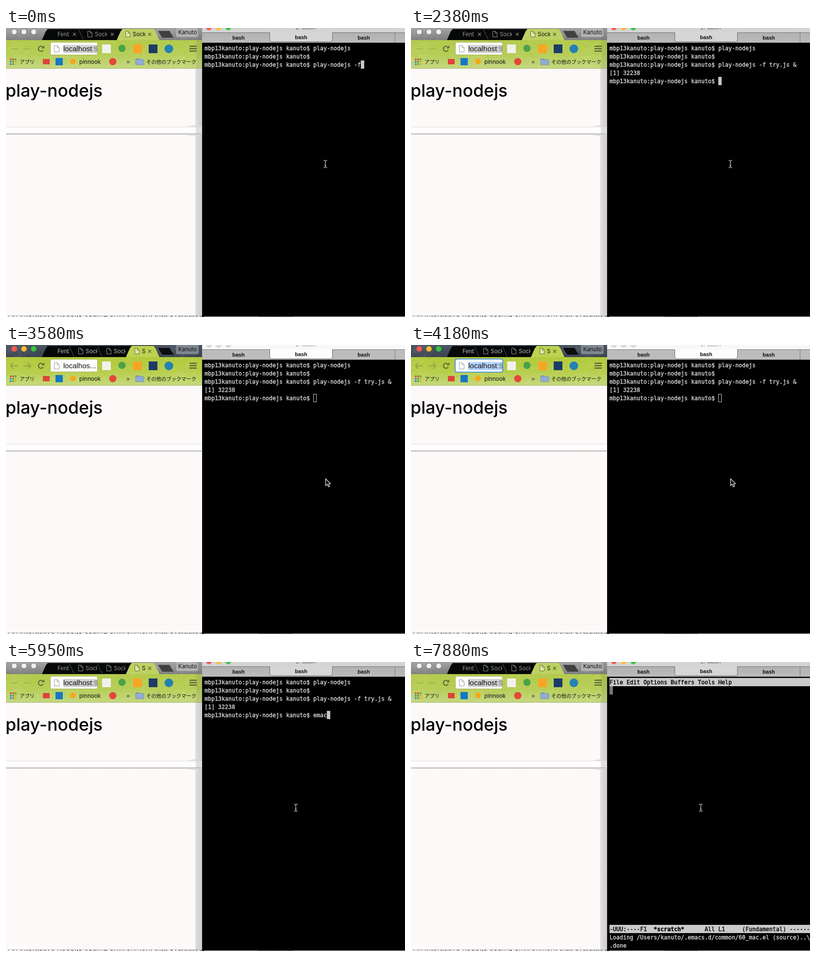
Animation of 822x597 px, one loop 8 s. Source, as an HTML page with a canvas:

```html
<!DOCTYPE html>
<html lang="ja">
<head>
<meta charset="utf-8">
<title>play-nodejs</title>
<style>
html, body { margin: 0; width: 100%; height: 100%; overflow: hidden; background: #000; }
canvas { display: block; }
</style>
</head>
<body>
<canvas id="stage" width="822" height="597"></canvas>
<script>
const ctx = document.getElementById('stage').getContext('2d');
const LOOP = 8000;
const SANS = '"Liberation Sans", Arial, sans-serif';
const UI = 'Inter, "Noto Sans CJK JP", "Noto Sans CJK", sans-serif';
const JP = '"Noto Sans CJK JP", "Noto Sans CJK", sans-serif';
const MONO = '"DejaVu Sans Mono", monospace';
const CELL = 7, ROW = 17, LEFT = 409, TOP = 33;
const USER = 'kanuto';
const PROMPT = `mbp13${USER}:play-nodejs ${USER}$ `;

// Latest entry of [time, value] steps that has begun
const at = (t, steps) => steps.reduce((v, s) => (t >= s[0] ? s[1] : v), steps[0][1]);
const mix = (a, b, p) => a + (b - a) * p;

function rect(x, y, w, h, fill) {
  ctx.fillStyle = fill;
  ctx.fillRect(x, y, w, h);
}

function round(x, y, w, h, r, fill, stroke) {
  ctx.beginPath();
  ctx.roundRect(x, y, w, h, r);
  if (fill) { ctx.fillStyle = fill; ctx.fill(); }
  if (stroke) { ctx.strokeStyle = stroke; ctx.stroke(); }
}

function dot(x, y, r, fill, stroke) {
  ctx.beginPath();
  ctx.arc(x, y, r, 0, Math.PI * 2);
  ctx.fillStyle = fill;
  ctx.fill();
  if (stroke) { ctx.lineWidth = 1; ctx.strokeStyle = stroke; ctx.stroke(); }
}

function poly(points, fill, stroke) {
  ctx.beginPath();
  points.forEach(([x, y], i) => (i ? ctx.lineTo(x, y) : ctx.moveTo(x, y)));
  ctx.closePath();
  if (fill) { ctx.fillStyle = fill; ctx.fill(); }
  if (stroke) { ctx.strokeStyle = stroke; ctx.stroke(); }
}

function lines(color, width, ...segs) {
  ctx.strokeStyle = color;
  ctx.lineWidth = width;
  ctx.beginPath();
  for (const [x1, y1, x2, y2] of segs) {
    ctx.moveTo(x1, y1);
    ctx.lineTo(x2, y2);
  }
  ctx.stroke();
}

function text(str, x, y, font, color, align = 'left') {
  ctx.font = font;
  ctx.fillStyle = color;
  ctx.textAlign = align;
  ctx.fillText(str, x, y);
}

function clipped(x, y, w, h, draw) {
  ctx.save();
  ctx.beginPath();
  ctx.rect(x, y, w, h);
  ctx.clip();
  draw();
  ctx.restore();
}

function gradient(x1, y1, x2, y2, ...colors) {
  const g = ctx.createLinearGradient(x1, y1, x2, y2);
  colors.forEach((c, i) => g.addColorStop(i / (colors.length - 1), c));
  return g;
}

// Faint rings of the browser theme
function rings(x, y, w, h, color) {
  let seed = 7;
  const rnd = () => (seed = (seed * 16807) % 2147483647) / 2147483647;
  clipped(x, y, w, h, () => {
    ctx.strokeStyle = color;
    ctx.lineWidth = 1;
    for (let i = 0; i < 26; i++) {
      const cx = x + rnd() * w, cy = y + rnd() * h;
      for (let r = 5; r < 18; r += 4) {
        const a = rnd() * 6;
        ctx.beginPath();
        ctx.arc(cx, cy, r, a, a + 4);
        ctx.stroke();
      }
    }
  });
}

function cross(x, y, r, color, width) {
  lines(color, width, [x - r, y - r, x + r, y + r], [x - r, y + r, x + r, y - r]);
}

function sheet(x, y, w, h, fill, stroke) {
  ctx.lineWidth = 1;
  poly([[x, y], [x + w - 4, y], [x + w, y + 4], [x + w, y + h], [x, y + h]], fill, stroke);
  lines(stroke, 1, [x + w - 4, y, x + w - 4, y + 4], [x + w - 4, y + 4, x + w, y + 4]);
}

function lights(x, y, on, fill, edge) {
  ['#fc5650', '#fdbc2f', '#34c63f'].forEach((c, i) =>
    dot(x + i * 20, y, 5.7, on ? c : fill, on ? null : edge));
}

function tabStrip(s) {
  const on = s.browserOn;
  rect(0, 0, 404, 25, on ? gradient(0, 0, 0, 25, '#4a5663', '#3a434d') : gradient(0, 0, 0, 25, '#a3a3a3', '#7d7d7d'));
  rings(0, 0, 404, 25, on ? 'rgba(160,180,195,.16)' : 'rgba(255,255,255,.08)');
  lights(17, 8, on, '#efefef', '#777');

  const from = [80, 156, 234, 310], to = [80, 137, 195, 253];
  const starts = from.map((v, i) => mix(v, to[i], s.open));
  const count = s.open ? 4 : 3;
  const names = ['Fenb', 'Sock', 'Sock', 'Sock'];
  for (let i = 0; i < count; i++) {
    const x = starts[i], active = i === count - 1;
    const end = active ? 310 : starts[i + 1];
    const wide = active || end - x > 70;
    const ink = active ? '#111' : on ? '#b4b8bb' : '#929292';
    const right = active ? [[end - 6, 2], [end - 2, 7], [end + 6, 25]] : [[end + 6, 2], [end + 6, 25]];
    poly([[x - 6, 25], [x + 2, 7], [x + 6, 2], ...right], active ? (on ? '#bdd24f' : '#bdd163') : '#070808');
    if (i && !active) lines(on ? '#4b555f' : '#5b5b5b', 1, [x - 6, 4, x + 3, 24]);
    let title = names[i];
    if (active && s.loading) {
      ctx.strokeStyle = '#7d8a48';
      ctx.lineWidth = 2;
      ctx.beginPath();
      ctx.arc(x + 18, 13, 5.5, s.spin, s.spin + 2.2);
      ctx.stroke();
      title = '無題';
    } else if (i) {
      sheet(x + 12.5, 6.5, 9, 12, active ? '#dce6a9' : '#070808', active ? '#66702e' : '#8d9194');
    }
    const limit = wide ? end - (active ? 23 : 26) : end - 7;
    clipped(x, 0, Math.max(0, limit - x), 25, () => text(title, x + (i ? 27 : 26), 17, '11.5px ' + UI, ink));
    if (wide) cross(end - (active ? 14 : 15), 13, 3, active ? '#5f6b2d' : '#777', 1.6);
  }
  poly([[313, 6], [337, 6], [345, 20], [322, 20]], on ? '#0b0d0f' : '#404040');
  ctx.lineWidth = 1;
  round(350, -4, 47, 23, 3, on ? '#7f8892' : '#b3b3b3', on ? '#59626b' : '#8c8c8c');
  text('Kanuto', 374, 13, '11.5px ' + UI, '#111', 'center');
}

function reload(x, y) {
  ctx.strokeStyle = '#64683f';
  ctx.lineWidth = 2.2;
  ctx.beginPath();
  ctx.arc(x, y, 5.2, 0.5, 5.4);
  ctx.stroke();
  poly([[x + 7, y - 7], [x + 7, y - 1], [x + 1, y - 1]], '#64683f');
}

function toolbar(s) {
  const on = s.browserOn;
  rect(0, 25, 404, 59, on ? gradient(0, 25, 0, 84, '#b2ca3c', '#b6cd4a', '#c6d97f')
    : gradient(0, 25, 0, 84, '#b3ca4c', '#b6cd57', '#c5d782'));
  rings(0, 25, 404, 58, 'rgba(225,238,150,.18)');
  rect(0, 83, 404, 1, '#a7b569');

  const arrow = on ? '#96a143' : '#a3b54b';
  lines(arrow, 2, [10, 43, 24, 43], [36, 43, 50, 43]);
  if (on) lines(arrow, 2, [15, 37, 9, 43], [9, 43, 15, 49], [45, 37, 51, 43], [51, 43, 45, 49]);
  if (s.loading) cross(73, 43, 5.5, '#55594a', 2.2);
  else reload(72, 43);

  ctx.lineWidth = 1;
  round(91.5, 29.5, 97, 26, 3, '#fff', '#a5b05c');
  if (s.url === 'focus') {
    ctx.lineWidth = 2;
    round(91, 29, 98, 27, 3, null, '#529ae0');
  }
  sheet(99.5, 36.5, 10, 13, '#fff', '#9a9a9a');
  clipped(93, 30, 95, 25, () => {
    const font = '15px ' + SANS;
    if (s.url === 'plain') return text('localhos...', 118, 48, font, '#111');
    rect(118, 35, 70, 17, s.url === 'focus' ? '#b3d4fd' : '#d2d2d2');
    text('localhost', 118, 48, font, '#111');
    const w = ctx.measureText('localhost').width;
    text(':9000', 118 + w, 48, font, '#6b6b6b');
  });

  rect(198, 34, 18, 18, '#f1f1ee');
  dot(239, 42, 7.5, '#4aa24a');
  rect(262, 34, 18, 18, '#f6a623');
  rect(294, 34, 18, 18, '#1c3b66');
  dot(335.5, 43, 9, '#2382b4');
  for (let i = 0; i < 3; i++) rect(378, 36.5 + i * 5, 15, 2.4, '#5d643a');

  const hues = ['#e2452f', '#e2452f', '#3aa757', '#3f7fe0', '#3aa757', '#f2a91f', '#3f7fe0', '#3aa757', '#f2a91f'];
  hues.forEach((c, i) => rect(8 + i % 3 * 5, 63 + Math.floor(i / 3) * 5, 3.4, 3.4, c));
  text('アプリ', 28, 74, '10.3px ' + JP, '#111');
  rect(76, 64, 14, 11, '#dd4437');
  rect(102, 62, 15, 15, '#1677c4');
  dot(138, 69, 6, '#f5a81c');
  text('pinnook', 151, 74, '11.7px ' + UI, '#111');
  dot(220, 69.5, 7.5, '#e5473a');
  text('»', 248, 74, '13px ' + SANS, '#333');
  ctx.lineWidth = 1;
  round(267, 63, 8, 4, 1, '#7793b8');
  round(267, 65, 17, 11, 1, '#92acd0', '#7590b3');
  text('その他のブックマーク', 289, 74, '10.3px ' + JP, '#111');
}

function page(s) {
  rect(0, 592, 404, 5, '#fff');
  clipped(0, 593, 404, 4, () =>
    text('An interactive node.js coding environment that evaluates', 4, 595.5, '16px ' + SANS, '#222'));
  round(0, 84, 404, 511, [0, 0, 4, 4], s.loaded ? '#fdf9f9' : '#fff');
  rect(3, 594, 398, 1, '#b9b9b9');
  if (s.loaded) {
    text('play-nodejs', -1, 142, '500 35.6px ' + UI, '#000');
    rect(0, 204, 403, 1, '#dedada');
    rect(0, 205, 403, 13, '#fffdfd');
    rect(0, 218, 403, 1, '#a3a0a0');
    rect(0, 219, 403, 2, gradient(0, 219, 0, 221, '#cfcbcb', '#f5f1f1'));
  }
  if (!s.browserOn) {
    const shade = gradient(388, 0, 404, 0, '#e2e0e0', '#cfcece');
    rect(390, 84, 14, 120, shade);
    rect(391, 205, 13, 13, '#e0dede');
    rect(390, 220, 14, 374, shade);
    poly([[374, 204], [390, 200], [390, 204]], '#e4e1e1');
    poly([[366, 220], [390, 220], [390, 224]], '#e4e1e1');
    rect(392, 0, 12, 84, 'rgba(90,90,90,.12)');
  }
}

// A hairline outline gives the heavier smoothing of the terminal
function row(str, n, color = '#d2d2d2', weight = '') {
  const y = TOP + n * ROW + 13;
  text(str, LEFT, y, `${weight} 11.63px ${MONO}`, color);
  ctx.strokeStyle = color;
  ctx.lineWidth = 0.4;
  ctx.strokeText(str, LEFT, y);
}

function caret(col, n, filled, color = '#c6c6c6') {
  const x = LEFT + col * CELL, y = TOP + n * ROW;
  if (filled) return rect(x, y, CELL, ROW, color);
  ctx.strokeStyle = color;
  ctx.lineWidth = 1;
  ctx.strokeRect(x + 0.5, y + 0.5, CELL - 1, ROW - 1);
}

function shell(t, on) {
  if (t >= 6680) return caret(0, 0, on);
  const first = at(t, [[0, '-f'], [150, '-f '], [440, '-f tr'], [1190, '-f try.js '], [2090, '-f try.js &']]);
  const next = at(t, [[0, ''], [5510, 'e'], [5800, 'em'], [5950, 'emac'], [6090, 'emacs '], [6390, 'emacs try.']]);
  const rows = [PROMPT + 'play-nodejs', PROMPT, PROMPT + 'play-nodejs ' + first];
  if (t >= 2380) rows.push('[1] 32238', PROMPT + next);
  rows.forEach((str, i) => row(str, i));
  caret(rows[rows.length - 1].length, rows.length - 1, on);
}

function editor(t) {
  rect(LEFT, TOP, 413, ROW, '#cacaca');
  row('File Edit Options Buffers Tools Help', 0, '#000');
  caret(0, 1, true, '#777');
  if (t < 7430) return;
  rect(LEFT, TOP + 30 * ROW, 413, ROW, '#cacaca');
  row('-UUU:----F1' + ' '.repeat(17) + 'All L1     (Fundamental) ------', 30, '#000');
  row(' '.repeat(13) + '*scratch*', 30, '#000', 'bold');
  if (t < 7580) return;
  const done = t >= 7880;
  row(`Loading /Users/${USER}/.emacs.d/common/${done ? '60_mac' : '50_key'}.el (source)..\\`, 31);
  row(done ? '.done' : '.', 32);
}

function terminal(t, s) {
  const on = !s.browserOn;
  rect(404, 0, 418, 597, '#000');
  rect(404, 0, 418, 9, on ? '#d4d4d4' : '#f8f8f8');
  lights(418, -1, on, '#dcdcdc', '#c9c9c9');
  rect(404, 9, 418, 21, on ? gradient(0, 9, 0, 30, '#b0b0b0', '#bcbcbc') : '#bcbcbc');
  rect(404, 9, 418, 1, '#777');
  rect(404, 30, 418, 1, '#4c4c4c');
  ctx.lineWidth = 1;
  round(543.5, 7, 129, 21.5, [0, 0, 4, 4], on ? '#d6d6d6' : '#fdfdfd', '#6b6b6b');
  rect(543, 5, 131, 4, on ? '#d4d4d4' : '#f8f8f8');
  text('1. bash', 617, 3, '13px ' + SANS, on ? '#6d6d6d' : '#a5a5a5', 'center');
  rect(801, 10, 1, 20, '#777');
  [479, 608, 737].forEach((x, i) => text('bash', x, i === 1 ? 23 : 24, 'bold 11px ' + SANS, '#111', 'center'));
  if (t >= 7280) editor(t);
  else shell(t, on);
  rect(408, 596, 414, 1, '#d5d5d5');
  for (let x = 522; x < 592; x += 5) rect(x, 596, 3, 1, '#777');
}

function pointer(x, y, beam) {
  if (beam) {
    lines('#d8d8d8', 1.2, [x, y - 6, x, y + 6], [x - 3.5, y - 8, x, y - 6], [x, y - 6, x + 3.5, y - 8],
      [x - 3.5, y + 8, x, y + 6], [x, y + 6, x + 3.5, y + 8], [x - 2, y + 3, x + 2, y + 3]);
    return;
  }
  const tip = [[0, 0], [0, 14], [3.3, 11], [5.6, 16.5], [8, 15.4], [5.8, 10.3], [10, 10]];
  ctx.lineWidth = 1.2;
  poly(tip.map(([a, b]) => [x + a + 0.5, y + b + 0.5]), '#000', '#f2f2f2');
}

function draw(t) {
  const s = {
    browserOn: t >= 2980 && t < 4770,
    open: at(t, [[0, 0], [2980, 0.5], [3130, 1]]),
    loading: t >= 2980 && t < 3580,
    loaded: t < 2980 || t >= 3580,
    spin: Math.floor((t - 2980) / 150) * 1.3 + 3.4,
    url: at(t, [[0, 'blur'], [2980, 'plain'], [4030, 'focus'], [4770, 'blur']])
  };
  tabStrip(s);
  toolbar(s);
  page(s);
  terminal(t, s);
  const [x, y] = at(t, [[0, [658, 281]], [2980, [658, 276]], [4470, [640, 284]], [4620, [610, 294]], [4770, [597, 301]]]);
  pointer(x, y, !s.browserOn);
}

const start = performance.now();
function tick() {
  draw((performance.now() - start) % LOOP);
  requestAnimationFrame(tick);
}
tick();
</script>
</body>
</html>
```
